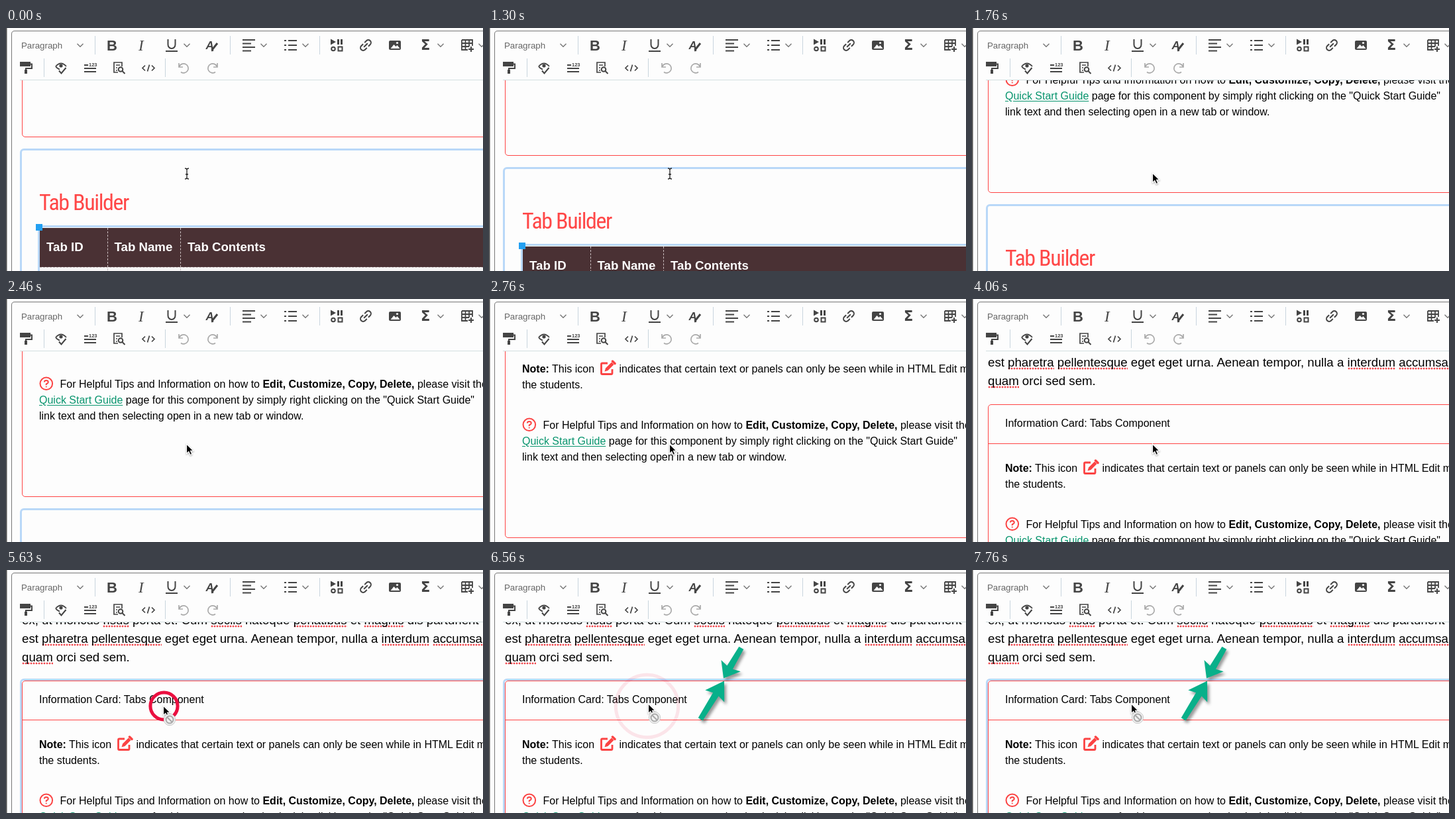
These frames come from a looping animation (720 by 367 pixels, 8000 ms). An HTML page:

```html
<!DOCTYPE html>
<html lang="en">
<head>
<meta charset="utf-8">
<title>Editor scroll</title>
<style>
html, body { margin: 0; width: 100%; height: 100%; overflow: hidden; background: #fdfdfd; }
body { position: relative; font: 16px/24px "Liberation Sans", Arial, sans-serif; color: #000; }
#page, #page > *, svg.layer { position: absolute; left: 0; top: 0; }
#page { width: 720px; height: 367px; }
#page > * { white-space: nowrap; box-sizing: border-box; }
.lorem { font-size: 18.667px; line-height: 28px; }
.bad {
  padding-bottom: 1px;
  background: radial-gradient(circle at 2px 2px, #f0474d 1.25px, transparent 1.7px) 0 100% / 4px 4px repeat-x;
}
a { color: #07946d; text-decoration: underline; text-underline-offset: 2px; }
.card { border: 1.4px solid #ff4444; border-radius: 5px; }
.glow { border: 3px solid #b9d8f8; border-radius: 6px; }
.title {
  font: 400 34px/44px "Roboto Condensed", "Open Sans Condensed", "Liberation Sans Narrow", Roboto, sans-serif;
  font-stretch: 75%; letter-spacing: -1.4px; color: #ff4747;
}
.th { font: bold 18.667px/28px "Liberation Sans", Arial, sans-serif; color: #fff; }
.dash { border-left: 1px dashed #cbbfc0; }
</style>
</head>
<body>
<div id="page"></div>

<svg class="layer" width="720" height="367" viewBox="0 0 720 367" fill="none">
  <path d="M0 0H720V79H9V367H0z" fill="#fdfdfd"/>
  <path d="M.8 0V367" stroke="#222" stroke-width="1.2"/>
  <path d="M8.5 367V9q0-4.500 4.500-4.500H720" stroke="#777"/>
  <path d="M21 78.500H720" stroke="#d3dfe1"/>
  <path d="M134.500 12V40M338.500 12V40M473.500 12V40M57.500 46V74M240.500 46V74" stroke="#c9d5de"/>
  <g id="chevrons" stroke="#777" stroke-width="1.4"></g>
  <g fill="#444" font-family="Liberation Sans, Arial, sans-serif">
    <text x="23" y="31" font-size="13.3" fill="#666">Paragraph</text>
    <text x="152" y="34" font-size="22" font-weight="bold">B</text>
    <text x="200" y="34" font-size="23" font-style="italic" font-family="Liberation Serif, serif">I</text>
    <text x="301.500" y="32" font-size="17" font-style="italic" font-weight="bold">A</text>
    <text x="626" y="33" font-size="21" font-weight="bold" font-family="DejaVu Sans, sans-serif" id="sum">Σ</text>
    <text x="125" y="58" font-size="7.500" font-weight="bold">123</text>
  </g>
  <g stroke="#444" stroke-width="2">
    <path d="M244.500 17V25a5.500 6 0 0 0 11 0V17M241 35H259"/>
    <path d="M311 33l8-10M310 34l3-1" stroke-width="3"/>
    <path d="M357 18H376M357 23.500H370M357 29H376M357 34.500H370"/>
    <path d="M426 19H439M426 26H439M426 33H439"/>
    <path d="M420 19h3M420 26h3M420 33h3"/>
    <path d="M501.500 17V25M506.500 17V25" stroke-width="3"/>
    <path d="M490 16.500l8 4.500-8 4.500z" fill="#444" stroke="none"/>
    <circle cx="494" cy="31.500" r="2.800"/>
    <rect x="501.500" y="28.500" width="6" height="6"/>
    <g transform="rotate(-45 543 26)">
      <path d="M541.500 22H537.500a4 4 0 0 0 0 8H541.500M544.500 22H548.500a4 4 0 0 1 0 8H544.500M539 26H547"/>
    </g>
    <rect x="578" y="19" width="18" height="14" rx="2" fill="#444" stroke="none"/>
    <path d="M580.500 31l5-6 3 3 2-2 4 5z" fill="#fdfdfd" stroke="none"/>
    <circle cx="590.500" cy="22.500" r="1.600" fill="#fdfdfd" stroke="none"/>
    <path d="M688 18H704V27M688 18V33H697M688 23H704M688 28H699M693.500 18V33M699 18V28" stroke-width="1.800"/>
    <path d="M702 28V36M698 32H706"/>

    <rect x="22" y="52" width="14" height="5" fill="#444"/>
    <path d="M36 54.500H39V61H30V64"/>
    <path d="M30 63V69" stroke-width="4"/>
    <path d="M75 58q8-9 16 0M75 58q3 4 6 4.500" stroke-width="1.800"/>
    <circle cx="83" cy="57" r="2.600" fill="#444" stroke="none"/>
    <path d="M80 64.500l3.500 4 7-8.500"/>
    <path d="M118 56H124M118 61H136M118 66H136" stroke-width="1.800"/>
    <path d="M175 58V52H163V67H169M166 56H172M166 60H168M166 64H168" stroke-width="1.700"/>
    <circle cx="173" cy="62.500" r="3.300"/>
    <path d="M175.500 65l4 4"/>
    <path d="M210 56.500l-4 4 4 4M220 56.500l4 4-4 4M216.500 55.500l-3 10" stroke-width="1.700"/>
    <path d="M261 53V59H267M261.500 58.500A7 7 0 1 1 264 66.500" stroke="#aaa" stroke-width="1.700"/>
    <path d="M319 53V59H313M318.500 58.500A7 7 0 1 0 316 66.500" stroke="#aaa" stroke-width="1.700"/>
  </g>
</svg>

<svg class="layer" width="720" height="367" viewBox="0 0 720 367" fill="none">
  <g id="arrows" fill="#08b08a" style="filter:drop-shadow(3px 4px 2px rgba(0,0,0,.4))"></g>
  <circle id="ring" cx="238.500" cy="205.500" stroke="#ea1040"/>
  <path id="beam" d="M270 212q3 0 3 2 0-2 3-2M273 214V226M270 228q3 0 3-2 0 2 3 2M271 221H275" stroke="#222" stroke-width="1.300"/>
  <g id="pointer">
    <path d="M0 0V14.500l3.300-3.100 2.300 5.200 2.700-1.200-2.200-5H10.500z" fill="#000" stroke="#fff" stroke-width="1.200" style="filter:drop-shadow(0 1px 1px rgba(0,0,0,.35))"/>
    <g id="badge">
      <circle cx="9.500" cy="21" r="8.700" fill="#f1f1f1" stroke="#c9c9c9"/>
      <circle cx="9.500" cy="21" r="5.500" stroke="#a9a9a9" stroke-width="2"/>
      <path d="M5.700 17.200l7.600 7.600" stroke="#a9a9a9" stroke-width="2"/>
    </g>
  </g>
</svg>

<script>
const $ = id => document.getElementById(id);
const page = $('page');
const LOOP = 8000;

function add(cls, x, y, html = '', w, h, css = '') {
  const el = document.createElement('div');
  el.className = cls;
  el.style.cssText = `left:${x}px;top:${y}px;${w ? `width:${w}px;height:${h}px;` : ''}${css}`;
  el.innerHTML = html;
  page.append(el);
  return el;
}
// y is the middle of the line
const line = (x, y, html) => add('', x, y - 12, html);
const lorem = (y, s) =>
  add('lorem', 24, y - 14, s.replace(/_(\w+)_/g, '<span class="bad">$1</span>'));

lorem(76, 'ex, ut rhoncus _risus_ porta et. Cum _sociis_ natoque _penatibus_ et _magnis_ dis parturient montes');
lorem(104, 'est _pharetra_ _pellentesque_ eget eget urna. Aenean tempor, nulla a _interdum_ _accumsan_');
lorem(132, '_quam_ orci sed sem.');

const glow = add('glow', 21, 163.5, '', 760, 358);
add('card', 24, 166.5, '', 760, 352);
add('', 24, 225.5, '', 760, 1.4, 'background:#ff4444');
line(50, 196, 'Information Card: Tabs Component');
line(50, 264, '<b>Note:</b> This icon');
line(196.5, 264, 'indicates that certain text or panels can only be seen while in HTML Edit mode');
line(50, 288, 'the students.');
line(81.5, 349, 'For Helpful Tips and Information on how to <b>Edit, Customize, Copy, Delete,</b> please visit the');
line(50, 372.5, '<a>Quick Start Guide</a> page for this component by simply right clicking on the "Quick Start Guide"');
line(50, 396.5, 'link text and then selecting open in a new tab or window.');
add('', 167, 250, `<svg width="26" height="26" fill="none" stroke="#fb4343" style="display:block">
  <path d="M12 5H4Q2.500 5 2.500 6.500V20Q2.500 21.500 4 21.500H17.500Q19 21.500 19 20V14" stroke-width="2.800"/>
  <path d="M7.500 17.500L9 12.500 18 3.500 21.500 7 12.500 16z" fill="#fb4343" stroke="none"/>
  <path d="M19.500 2L23 5.500" stroke-width="3.500" stroke-linecap="round"/></svg>`);
add('', 50, 337, `<svg width="22" height="22" fill="none" stroke="#fb4343" style="display:block">
  <circle cx="10.800" cy="10.800" r="9.300" stroke-width="2"/>
  <path d="M7.800 8.500Q8 6 10.800 6T13.800 8.500Q13.800 10 12 10.700T10.800 13" stroke-width="2"/>
  <circle cx="10.800" cy="15.500" r=".7"/></svg>`);

add('glow', 21, 535.5, '', 760, 500);
add('title', 50, 595, 'Tab Builder');
add('', 48, 652, '', 760, 200, 'border:3px solid #b9d8f8');
add('', 51, 656, '', 760, 59, 'background:#4a3134');
add('', 51, 715, '', 760, 100, 'background:#f6f5f5;border-top:1px dashed #c4babb');
[[61, 'Tab ID'], [163.5, 'Tab Name'], [274, 'Tab Contents']].forEach(([x, s]) => add('th', x, 670.5, s));
[153, 263].forEach(x => add('dash', x, 656, '', 1, 100));
add('', 45, 650, '', 10, 10, 'background:#23a0f2');

[[112, 26], [273, 26], [389, 26], [452, 26], [656, 26], [718, 26]].forEach(([x, y]) =>
  $('chevrons').innerHTML += `<path d="M${x - 4.5} ${y - 2.2}l4.500 4.500 4.500-4.500"/>`);

// arrow along x, tip at the origin
const arrow = (x, y, deg, len, head) =>
  `<path transform="translate(${x} ${y}) rotate(${deg})"
    d="M0 0L${-head} -17L${3 - head} -5L${-len} -4V4L${3 - head} 5L${-head} 17z"/>`;
$('arrows').innerHTML = arrow(354, 163.5, 120.4, 53, 22) + arrow(355, 167.5, -58.2, 68, 27);

const soft = p => 1 - (1 - p) ** 1.6;
const scroll = [
  [1170, -354], [1760, -270, soft], [1930, -270], [2160, -226, soft],
  [2430, -226], [2760, -158], [3030, -102, soft], [3300, -102], [3330, -98],
  [3600, -42, soft], [3870, -42], [4060, -8, soft], [4370, -8], [4460, 0]
];
const moveX = [[4900, 272.5], [5060, 237.5, soft], [6050, 237.5], [6200, 240.5]];
const moveY = [[4900, 219], [5060, 205, soft], [6050, 205], [6200, 202]];
const ringSize = [[5400, 14], [6660, 50]];
const ringFade = [[5700, 1], [6660, 0]];
const arrowFade = [[5680, 0], [6200, 1]];

function at(keys, t) {
  const i = keys.findIndex(k => k[0] > t);
  if (i < 0) return keys[keys.length - 1][1];
  if (!i) return keys[0][1];
  const [t0, a] = keys[i - 1], [t1, b, ease = p => p] = keys[i];
  return a + (b - a) * ease((t - t0) / (t1 - t0));
}
const show = (el, on) => el.setAttribute('opacity', +on);

function draw(t) {
  const y = Math.round(at(scroll, t));
  const overText = y < -300;
  page.style.transform = `translateY(${y}px)`;
  glow.style.opacity = t >= 5400 ? 1 : 0;
  show($('beam'), overText);
  show($('pointer'), !overText);
  show($('badge'), t >= 5460);
  $('pointer').setAttribute('transform', `translate(${at(moveX, t)} ${at(moveY, t)})`);
  $('ring').setAttribute('r', at(ringSize, t));
  $('ring').setAttribute('stroke-width', 5);
  show($('ring'), t >= 5400 ? at(ringFade, t) : 0);
  show($('arrows'), at(arrowFade, t));
}

const start = performance.now();
function tick() {
  draw((performance.now() - start) % LOOP);
  requestAnimationFrame(tick);
}
tick();
</script>
</body>
</html>
```
